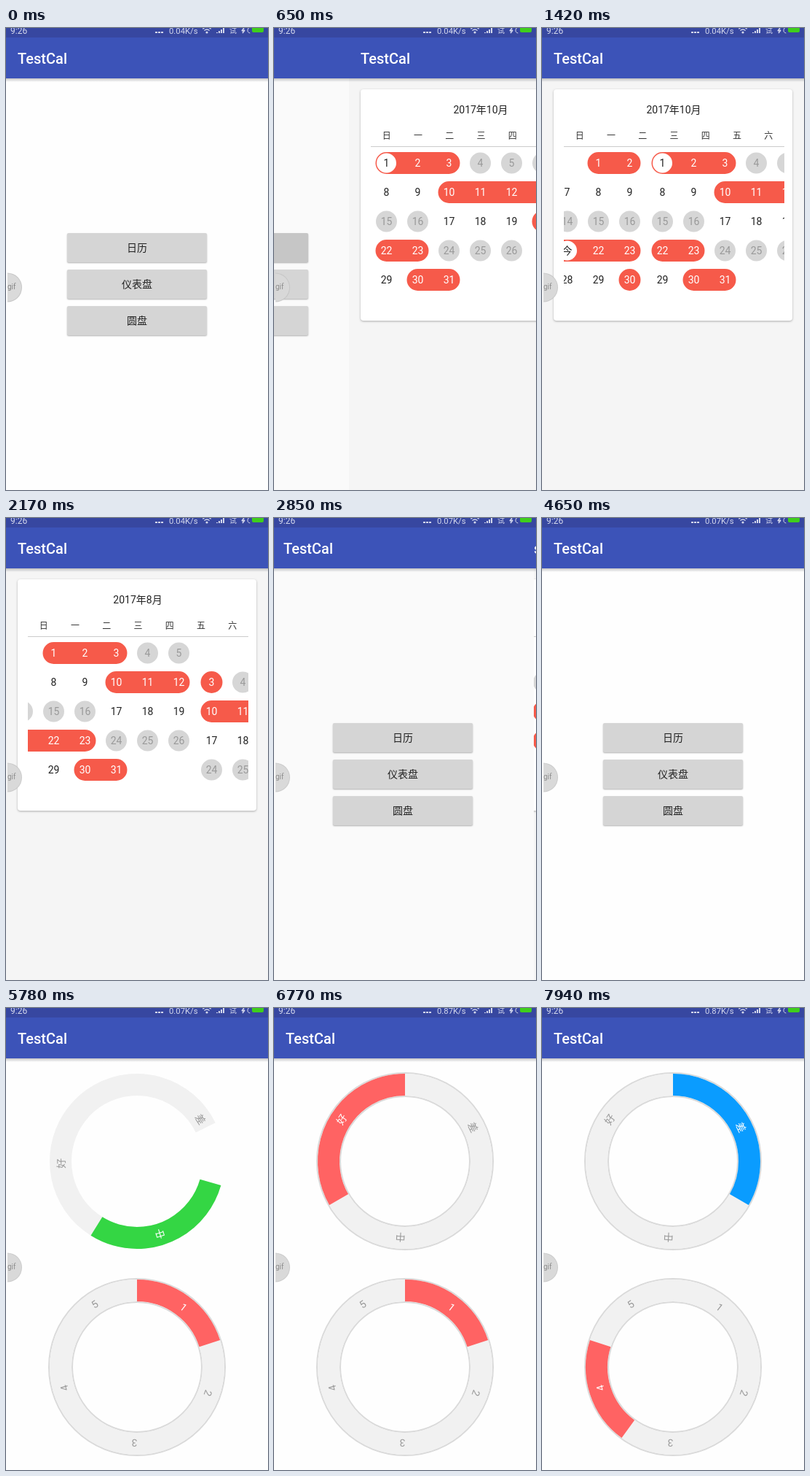
Animation of 360 by 633 pixels, one loop 8.43 s. Source, as an HTML page with a canvas:

```html
<!DOCTYPE html>
<html lang="zh">
<head>
<meta charset="utf-8">
<title>TestCal</title>
<style>
  html, body { margin: 0; width: 360px; height: 633px; overflow: hidden; background: #fefefe; }
  canvas { display: block; }
</style>
</head>
<body>
<canvas id="stage" width="360" height="633"></canvas>
<script>
const W = 360, H = 633, LOOP = 8430;
const FONT = 'Roboto, "Noto Sans CJK SC", "Noto Sans CJK", sans-serif';
const BLUE = '#0a9cff', GREEN = '#34d644', RED = '#ff6363', ORANGE = '#ff8438', CORAL = '#f65a4a';
const ctx = document.getElementById('stage').getContext('2d');

// The screen refreshes only at these times: [first, last, number of refreshes].
const REFRESHES = [
  [120], [400, 840, 6], [1260, 2070, 11], [2170, 2380, 3], [2660, 2940, 4],
  [3230, 4000, 9], [4460, 4650, 3], [5120, 5880, 9],
  [5970], [6200], [6360], [6770], [6920], [7550], [7940]
];

function lastRefresh(t) {
  let shown = 0;
  for (const [a, b = a, n = 1] of REFRESHES) {
    if (t < a) break;
    const step = (b - a) / (n - 1) || 1;
    shown = a + Math.min(n - 1, Math.floor((t - a + 5) / step)) * step;
  }
  return shown;
}

const part = (t, a, b) => Math.max(0, Math.min(1, (t - a) / (b - a)));
const smooth = p => p * p * (3 - 2 * p);
const easeOut = (p, power = 3) => 1 - (1 - p) ** power;
const rad = deg => (deg - 90) * Math.PI / 180;

function text(s, x, y, size, color, align = 'center', weight = 400) {
  ctx.font = `${weight} ${size}px ${FONT}`;
  ctx.textAlign = align;
  ctx.fillStyle = color;
  ctx.fillText(s, x, y);
}

function box(x, y, w, h, r, color) {
  ctx.fillStyle = color;
  ctx.beginPath();
  ctx.roundRect(x, y, w, h, r);
  ctx.fill();
}

function disc(x, y, r, color) {
  ctx.fillStyle = color;
  ctx.beginPath();
  ctx.arc(x, y, r, 0, 7);
  ctx.fill();
}

function line(x1, y1, x2, y2, color, width = 1) {
  ctx.strokeStyle = color;
  ctx.lineWidth = width;
  ctx.beginPath();
  ctx.moveTo(x1, y1);
  ctx.lineTo(x2, y2);
  ctx.stroke();
}

// Arc around the current origin; 0 degrees points up.
function arc(r, from, to, color, width) {
  ctx.strokeStyle = color;
  ctx.lineWidth = width;
  ctx.beginPath();
  ctx.arc(0, 0, r, rad(from), rad(to));
  ctx.stroke();
}

function at(x, y, deg, draw) {
  ctx.save();
  ctx.translate(x, y);
  ctx.rotate(deg * Math.PI / 180);
  draw();
  ctx.restore();
}

const around = (s, deg, r, size, color) =>
  at(0, 0, deg, () => text(s, 0, -r + size * .36, size, color));

function shadowed(blur, draw) {
  ctx.save();
  ctx.shadowColor = 'rgba(0,0,0,.3)';
  ctx.shadowBlur = blur;
  ctx.shadowOffsetY = 1;
  draw();
  ctx.restore();
}

function menu(t) {
  const pressed = [[400, 900], [3230, 3700], [5120, 5600]];
  ['日历', '仪表盘', '圆盘'].forEach((label, i) => {
    const y = 281 + 50 * i, [down, up] = pressed[i];
    const color = t >= down && t < up ? '#c6c6c6' : '#d5d5d5';
    shadowed(2, () => box(84, y, 192, 40, 2, color));
    text(label, 180, y + 25, 14, '#222');
  });
}

const PAGE = 303, CELL = Math.floor(PAGE / 7);

function month(number, x) {
  const start = new Date(2017, number - 1, 1).getDay();
  const days = new Date(2017, number, 0).getDate();
  const isRun = d => d > 0 && d <= days && d % 10 < 4;
  for (let d = 1; d <= days; d++) {
    const cell = start + d - 1, col = cell % 7;
    const cx = x + (col + .5) * CELL, cy = 185 + 40 * Math.floor(cell / 7);
    const today = number === 9 && d === 21;
    const marked = today || number === 10 && d === 1;
    let color = '#222';
    if (isRun(d)) {
      const left = col > 0 && isRun(d - 1), right = col < 6 && isRun(d + 1);
      const x1 = left ? cx - CELL / 2 : cx - 15, x2 = right ? cx + CELL / 2 : cx + 15;
      box(x1, cy - 15, x2 - x1, 30, [left ? 0 : 15, right ? 0 : 15, right ? 0 : 15, left ? 0 : 15], CORAL);
      if (marked) disc(cx, cy, 13.5, '#fff');
      else color = '#fff';
    } else if (d % 10 < 7) {
      disc(cx, cy, 14.5, '#d6d6d6');
      color = '#999';
    }
    text(today ? '今' : d, cx, cy + 5, 14, color);
  }
}

function calendar(t) {
  const pages = smooth(part(t, 1193, 1742)) + smooth(part(t, 1760, 2360));
  shadowed(3, () => box(16, 84, 328, 317, 4, '#fff'));
  text(`2017年${10 - Math.round(pages)}月`, 181, 117, 14, '#222');
  [...'日一二三四五六'].forEach((s, i) => text(s, 30 + (i + .5) * PAGE / 7, 152, 12, '#333'));
  line(30, 162.5, 333, 162.5, '#ccc');
  ctx.save();
  ctx.beginPath();
  ctx.rect(30, 163, PAGE, 200);
  ctx.clip();
  const scrolled = Math.round(PAGE * pages);
  for (let i = 0; i < 3; i++) month(10 - i, 30 + scrolled - PAGE * i);
  ctx.restore();
}

function gauge(g, p) {
  at(180, g.y, 0, () => {
    for (const [from, to, color, label, labelAngle] of g.zones) {
      arc(g.r, from, to, color, g.width);
      around(label, labelAngle, g.r, 9, '#fff');
    }
    const ends = [[-150, g.zones[0][2]], [150, g.zones[2][2]]];
    for (const [deg, color] of ends)
      disc(g.r * Math.cos(rad(deg)), g.r * Math.sin(rad(deg)), g.width / 2, color);

    const labels = (g.max - g.min) / 10, ticks = labels * 5;
    for (let i = 0; i <= ticks; i++)
      at(0, 0, -150 + 300 * i / ticks, () => line(0, -g.tick, 0, -g.tick - 2, '#ccc', .8));
    for (let i = 0; i <= labels; i++)
      around(g.min + 10 * i, -150 + 300 * i / labels, g.labelR, 8, '#999');

    const value = g.min + (g.value - g.min) * p;
    at(0, 0, -150 + 300 * (value - g.min) / (g.max - g.min), () => line(0, -g.hub, 0, -67, '#ccc', 1.5));
    arc(g.hub, 0, 360, '#ccc', 1.5);
    text(Math.round(value) + g.unit, -6, 107, 14, '#222', 'left');
  });
}

const TEMPERATURE = {
  y: 210, r: 99.5, width: 11, min: -20, max: 60, value: 30, unit: '℃', hub: 5, labelR: 85, tick: 91,
  zones: [[-150, -22.5, BLUE, '寒冷', -87], [-19, 13, GREEN, '舒适', -1.5], [18, 150, RED, '炎热', 83]]
};
const HUMIDITY = {
  y: 492, r: 100, width: 12, min: 0, max: 100, value: 70, unit: '%', hub: 10, labelR: 83, tick: 89,
  zones: [[-150, -80, ORANGE, '干燥', -116], [-76, 71, GREEN, '舒适', -2], [75, 150, BLUE, '潮湿', 109]]
};

function gauges(t) {
  const p = easeOut(part(t, 3400, 4000), 2);
  gauge(TEMPERATURE, p);
  gauge(HUMIDITY, p);
}

function ring(y, labels, selected, color, grown, nudge) {
  const span = 360 / labels.length * grown;
  at(180, y, 0, () => {
    if (grown === 1) {
      arc(121, 0, 360, '#dadada', 2);
      arc(89, 0, 360, '#dadada', 2);
    }
    arc(105, span, span + 360 * grown, '#f1f1f1', 30);
    arc(105, selected * span, (selected + 1) * span, color, 30);
    labels.forEach((s, i) =>
      around(s, (i + .5) * span + nudge, 104, 14, i === selected ? '#fff' : '#999'));
  });
}

function rings(t) {
  const top = t < 6360 ? 1 : t < 6920 ? 2 : 0;
  const bottom = t < 7550 ? 0 : t < 7940 ? 4 : 3;
  ring(210, [...'差中好'], top, [BLUE, GREEN, RED][top], easeOut(part(t, 5300, 6037), 2), 3.5);
  ring(492, [...'12345'], bottom, RED, 1, 2);
}

function page(draw, t, x, background = '#fefefe') {
  ctx.save();
  ctx.translate(Math.round(x), 0);
  ctx.beginPath();
  ctx.rect(0, 0, W, H);
  ctx.clip();
  box(0, 0, W, H, 0, background);
  draw(t);
  const shade = ctx.createLinearGradient(0, 69, 0, 74);
  shade.addColorStop(0, 'rgba(0,0,0,.22)');
  shade.addColorStop(1, 'rgba(0,0,0,0)');
  box(0, 69, W, 5, 0, shade);
  box(0, 0, W, 69, 0, '#3c53b8');
  box(0, 0, W, 13, 0, '#3747a0');
  text('TestCal', 16, 49, 20, '#fff', 'left', 500);
  ctx.restore();
}

function statusBar(t) {
  const light = '#d4d8ec';
  const speed = t < 2660 ? '0.04' : t < 6770 ? '0.07' : '0.87';
  text('9:26', 6, 8, 12, light, 'left');
  for (let i = 0; i < 3; i++) box(205 + 4 * i, 5, 3, 2, 0, light);
  text(speed + 'K/s', 224, 8, 11.3, light, 'left');
  at(276, 7, 0, () => {
    arc(8, -45, 45, light, 1.3);
    arc(5, -45, 45, light, 1.3);
    disc(0, -1, 1.6, light);
  });
  for (let i = 0; i < 4; i++) box(289 + 3 * i, 6 - 2 * i, 2, 1 + 2 * i, 0, light);
  text('试', 312, 7, 10, light);
  line(327, 0, 324, 4, light, 1.5);
  line(324, 4, 328, 3, light, 1.5);
  line(328, 3, 325, 7, light, 1.5);
  at(336, 3, 0, () => arc(4, 190, 350, light, 1));
  box(338, -3, 16, 9, 2, '#3fce1c');
}

function badge(t) {
  ctx.save();
  ctx.beginPath();
  ctx.rect(2, 335, 21, 41);
  ctx.clip();
  ctx.globalAlpha = t < 120 ? .95 : .85;
  disc(2, 355.5, 20, '#c4c4c4');
  disc(2, 355.5, 19, '#dcdcdc');
  text('gif', 2, 358, 10, '#808080', 'left');
  ctx.restore();
}

// [page, opening from, to, closing from, to, background]
const VISITS = [
  [calendar, 440, 840, 2600, 2910, '#f5f5f5'],
  [gauges, 3270, 3650, 4340, 4650],
  [rings, 5160, 5560, LOOP, LOOP + 300]
];

function render(t) {
  ctx.clearRect(0, 0, W, H);
  const visit = VISITS.find(([, from, , , to]) => t > from && t < to);
  if (!visit) {
    page(menu, t, 0);
  } else {
    const [draw, openFrom, openTo, closeFrom, closeTo, background] = visit;
    const opened = easeOut(part(t, openFrom, openTo));
    const closed = easeOut(part(t, closeFrom, closeTo));
    const moving = '#fafafa';
    if (closed > 0) {
      page(draw, t, 322 * closed, background);
      page(menu, t, -W * (1 - closed), moving);
    } else {
      page(menu, t, -322 * opened, moving);
      page(draw, t, W * (1 - opened), background);
    }
  }
  statusBar(t);
  badge(t);
}

const begin = performance.now();
function tick() {
  render(lastRefresh((performance.now() - begin) % LOOP));
  requestAnimationFrame(tick);
}
tick();
</script>
</body>
</html>
```
